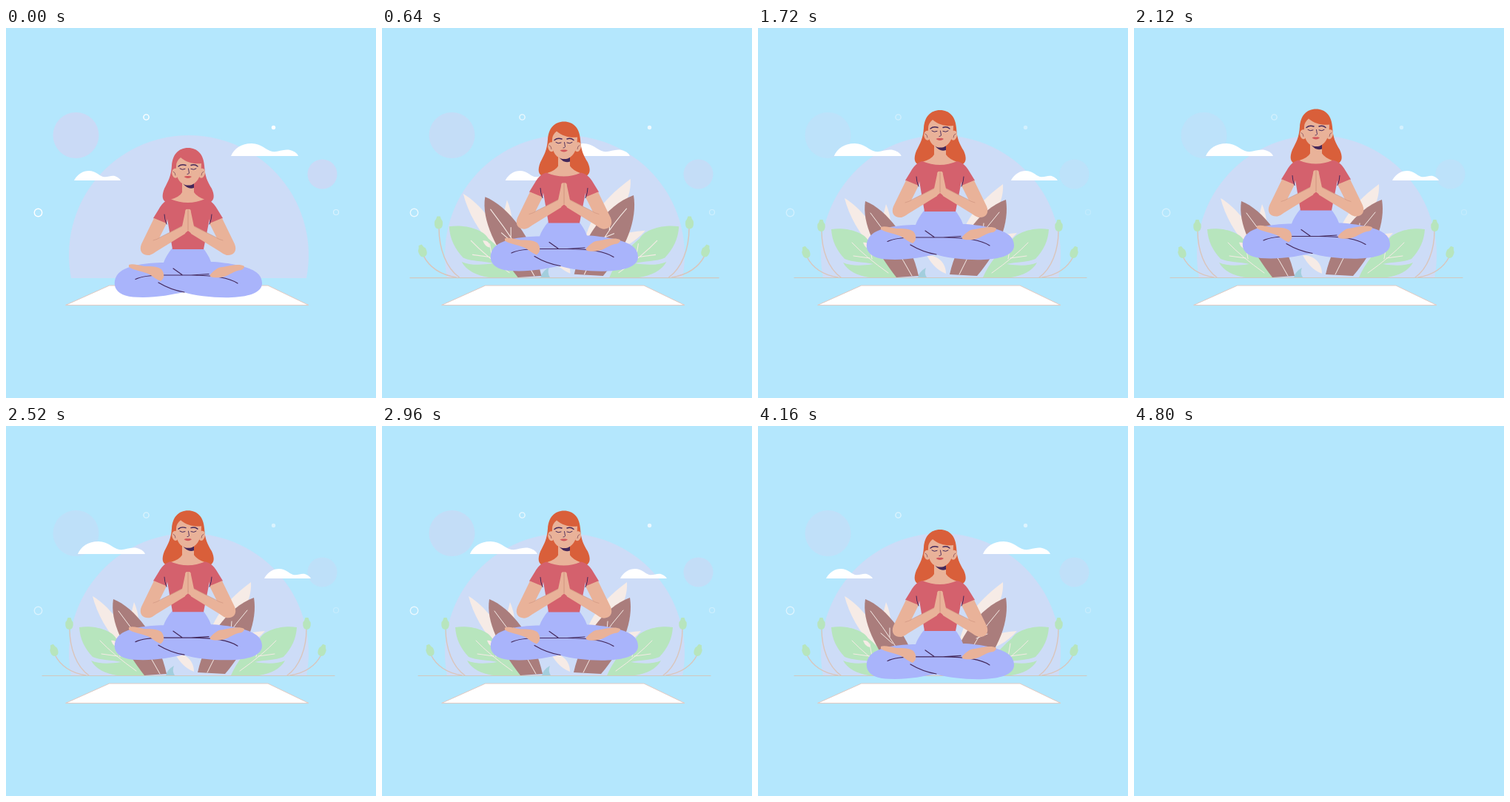
An HTML page with a canvas for the animation above (4840 ms loop, 500 by 500 pixels).

```html
<!DOCTYPE html>
<html lang="en">
<head>
<meta charset="utf-8">
<title>Meditation</title>
<style>
html, body { margin: 0; width: 100%; height: 100%; overflow: hidden; background: #b4e7fd; }
canvas { display: block; width: 500px; height: 500px; }
</style>
</head>
<body>
<canvas id="stage" width="500" height="500"></canvas>
<script>
const ctx = document.getElementById('stage').getContext('2d');
const LOOP = 4840, STEP = 40;
const SKY = '#b4e7fd', LAVENDER = '#cddcf7', SKIN = '#e9b299', SHIRT = '#d4616d',
  PANTS = '#a9b4fb', INK = '#43285a', BROWN = '#aa7d7c', GREEN = '#b7e5bd',
  CREAM = '#f6ebe6', STEM = '#dac5bb';

function fill(d, color) {
  ctx.fillStyle = color;
  ctx.fill(new Path2D(d));
}

function line(d, color, width) {
  ctx.strokeStyle = color;
  ctx.lineWidth = width;
  ctx.stroke(new Path2D(d));
}

function disc(x, y, r, color) {
  ctx.fillStyle = color;
  ctx.beginPath();
  ctx.arc(x, y, r, 0, Math.PI * 2);
  ctx.fill();
}

function ring(x, y, r, width) {
  ctx.strokeStyle = '#fff';
  ctx.lineWidth = width;
  ctx.beginPath();
  ctx.arc(x, y, r, 0, Math.PI * 2);
  ctx.stroke();
}

function shifted(dx, dy, draw) {
  ctx.save();
  ctx.translate(dx, dy);
  draw();
  ctx.restore();
}

function mirrored(draw) {
  draw();
  ctx.save();
  ctx.translate(492, 0);
  ctx.scale(-1, 1);
  draw();
  ctx.restore();
}

// Timing
const span = (t, a, b) => Math.min(1, Math.max(0, (t - a) / (b - a)));
const sineOut = x => Math.sin(x * Math.PI / 2);
const sineInOut = x => (1 - Math.cos(x * Math.PI)) / 2;

function bezier(x1, y1, x2, y2) {
  const at = (a, b, s) => 3 * (1 - s) * (1 - s) * s * a + 3 * (1 - s) * s * s * b + s * s * s;
  return x => {
    if (x <= 0 || x >= 1) return x <= 0 ? 0 : 1;
    let lo = 0, hi = 1;
    for (let i = 0; i < 24; i++) {
      const mid = (lo + hi) / 2;
      if (at(x1, x2, mid) < x) lo = mid; else hi = mid;
    }
    return at(y1, y2, lo);
  };
}

const drift = bezier(.25, .25, .5, 1);
const pop = bezier(.36, -.01, .5, 1.38);

function lift(t) {
  if (t < 1051) return 53 * sineOut(span(t, 280, 1051));
  if (t < 3870) return 50 + 3 * Math.cos((t - 1051) / 560 * Math.PI * 2);
  return 53 * (1 - sineOut(span(t, 3870, 4600)));
}

const cloudShift = t => t < 2640
  ? drift(span(t, 280, 2000))
  : 1 - sineInOut(span(t, 2640, 4160));

const plantScale = t => t < 4160
  ? pop(span(t, 280, 745))
  : 1 - sineInOut(span(t, 4160, 4600));

const glowKeys = [[280, 1], [640, .75], [1400, .4], [1960, .4], [2520, .5], [3440, .95], [4160, .55]];

function glow(t) {
  let value = 1;
  for (let i = 1; i < glowKeys.length; i++) {
    const [a, from] = glowKeys[i - 1], [b, to] = glowKeys[i];
    if (t >= a) value = from + (to - from) * span(t, a, b);
  }
  return value;
}

// Scene parts
function backdrop(t) {
  const g = glow(t);
  ctx.globalAlpha = g;
  disc(94.5, 145, 31, '#cadaf6');
  disc(427.5, 197.5, 20, '#cadaf6');
  ring(189.5, 120.5, 3.6, 1.4);
  ring(43.5, 249.5, 5.2, 1.4);
  disc(361.5, 134.5, 2.7, '#fff');
  ctx.globalAlpha = g * .5;
  ring(446, 249, 3.5, 1.2);
  ctx.globalAlpha = 1;
  fill('M88 338 A162 162 0 1 1 406 338 Z', LAVENDER);
}

function clouds(t) {
  const k = cloudShift(t);
  shifted(-207 * k, 0, () => fill('M304 173C308 163 318 156 332 156C345 156 351 165 360 167C368 168 375 163 384 165C391 167 394 170 395 173Z', '#fff'));
  shifted(257 * k, 0, () => fill('M92 206C97 197 104 193 112 193C121 193 125 199 131 201C138 202 141 199 147 200C152 202 154 204 155 206Z', '#fff'));
}

function bud(x, y, angle) {
  ctx.save();
  ctx.translate(x, y);
  ctx.rotate(angle);
  fill('M-5 -3C-6 3 -4 7 0 7C4 7 6 3 5 -3Q3 -5 2 -9L-2 -9Q-3 -5 -5 -3Z', GREEN);
  ctx.restore();
}

function sidePlant() {
  line('M86 274C86 300 95 325 112 337', STEM, 1.4);
  line('M66 309C74 325 90 334 108 337', STEM, 1.4);
  bud(85.5, 268, 0);
  bud(65, 304, -.35);
  fill('M99 272C118 269 142 275 149 287C165 300 180 318 188 337L150 337C135 335 121 328 115 317C126 322 141 321 156 319C143 316 128 317 117 312C106 300 100 288 99 272Z', GREEN);
  line('M127 290Q145 309 176 331M151 294L154 312M129 308L151 311', CREAM, 1);
}

function plants(t) {
  const s = plantScale(t);
  if (s <= 0) return;
  ctx.save();
  ctx.translate(246, 337);
  ctx.scale(s, s);
  ctx.translate(-246, -337);
  fill('M117 230C139 243 160 270 174 304L157 299C137 279 123 254 117 230Z', CREAM);
  fill('M173 238C180 254 181 270 178 284L166 266Z', CREAM);
  fill('M331 211C333 240 312 268 281 291L272 292C279 258 301 233 331 211Z', CREAM);
  fill('M350 277C337 292 319 302 299 305L308 286C322 280 337 278 350 277Z', CREAM);
  mirrored(sidePlant);
  fill('M142 290C148 289 152 294 151 299Q145 298 142 290Z', CREAM);
  fill('M228 307C244 307 254 318 254 332Q238 326 228 307Z', CREAM);
  fill('M216 337Q218 329 227 324Q224 331 228 337Z', '#a2cedd');
  fill('M145 234C174 245 207 288 217 335L187 337C159 301 140 264 145 234Z', BROWN);
  fill('M335 232C340 263 326 300 296 335L259 333C269 288 299 245 335 232Z', BROWN);
  line('M152 250Q186 294 208 335M166 280L182 294M178 285L178 273M326 249Q294 285 272 333M304 276L305 264M295 287L310 281', CREAM, 1);
  line('M49 337.5H444', '#d2c7bd', 1.2);
  ctx.restore();
}

function mat() {
  const d = 'M140 348H354L409 374.5H81Z';
  fill(d, '#fff');
  line(d, '#e2cac2', 1);
}

function head(hair) {
  fill('M246 162C233 162 225 171 224 186C223 201 219 207 214 217C210 227 211 234 218 236L275 236C282 233 282 226 278 217C272 207 269 201 268 186C267 171 259 162 246 162Z', hair);
  fill('M238 204H254V222Q258 228 269 232Q246 243 222 232Q235 228 238 222Z', SKIN);
  fill('M239 208Q246 213 254 210V216Q246 219 239 210Z', INK);
  fill('M231 190C224 188 222 197 227 202Q230 204 232 201ZM263 190C270 188 271 197 266 202Q263 204 261 201Z', SKIN);
  fill('M230 186C229 200 233 209 242 212Q246 213 251 212C260 208 264 199 264 183C254 184 244 182 236 175C232 178 230 182 230 186Z', SKIN);
  line('M226 194Q229 195 229 199M267 194Q264 195 264 199', '#85505c', .8);
  line('M233 187Q237 183.5 243 185.5M250 185.5Q255 183.5 259 187', INK, 1.4);
  line('M235 190Q238 192.5 242 190.5M250 190.5Q254 192.5 257 190', INK, 1);
  line('M246.5 190L247.5 196Q247 197.5 245 197.5', INK, .9);
  fill('M240.5 201Q243 199.5 246 200Q249 199.5 251 201Q246 205 240.5 201Z', '#d2575b');
}

function arm() {
  fill('M200 257L183 292C179 302 185 308 194 307Q198 306 203 302L242 278L245 267L239 267L207 284L217 264Z', SKIN);
  line('M199 287Q204 286 210 282L238 268', '#d49a84', .8);
  line('M214 252Q214 258 217 265', INK, 1);
}

function torso() {
  fill('M222 231C214 233 210 239 207 244L199 257L217 265L218 258L225 299H267L275 258L275 265L293 257L285 244C282 239 278 233 269 231Q246 241 222 231Z', SHIRT);
  mirrored(arm);
  fill('M246 245Q242 244 242 249L238 268Q237 275 241 278L246 274L251 278Q255 275 254 268L250 249Q250 244 246 245Z', SKIN);
  line('M246 246V273', '#c98f79', .8);
}

function legs() {
  fill('M225 297C219 304 215 311 213 317C190 317 165 321 155 329C146 335 145 347 149 353C154 361 165 364 185 364C206 364 225 360 240 357C255 362 285 365 305 364C332 363 346 356 346 345C346 332 335 326 316 321C302 318 286 316 277 316C274 308 270 302 266 297Z', PANTS);
  line('M175 339.5C184 335 196 334 214 334L250 334C276 334 301 337 313 345M206 344C216 350 229 355 241 357M226 325L238 333.5M250 334L274 332.5', INK, 1.2);
  fill('M166 320C170 318 178 320 187 322C196 322 205 322 210 326C214 331 215 338 209 342C203 340 198 335 192 332C182 328 171 327 166 323Z', SKIN);
  fill('M322 322C316 318 303 321 293 323C286 323 281 328 276 333C273 338 286 338 295 336C302 334 308 328 318 327Q322 325 322 322Z', SKIN);
}

function woman(t) {
  shifted(0, -lift(t), () => {
    head(t < 280 ? '#d5616a' : '#d95f3a');
    legs();
    torso();
  });
}

function render(t) {
  ctx.fillStyle = SKY;
  ctx.fillRect(0, 0, 500, 500);
  if (t >= 4800) return;
  ctx.lineCap = 'round';
  backdrop(t);
  clouds(t);
  plants(t);
  mat();
  woman(t);
}

const start = performance.now();

function tick() {
  const t = (performance.now() - start) % LOOP;
  render(Math.floor(t / STEP) * STEP);
  requestAnimationFrame(tick);
}
tick();
</script>
</body>
</html>
```
